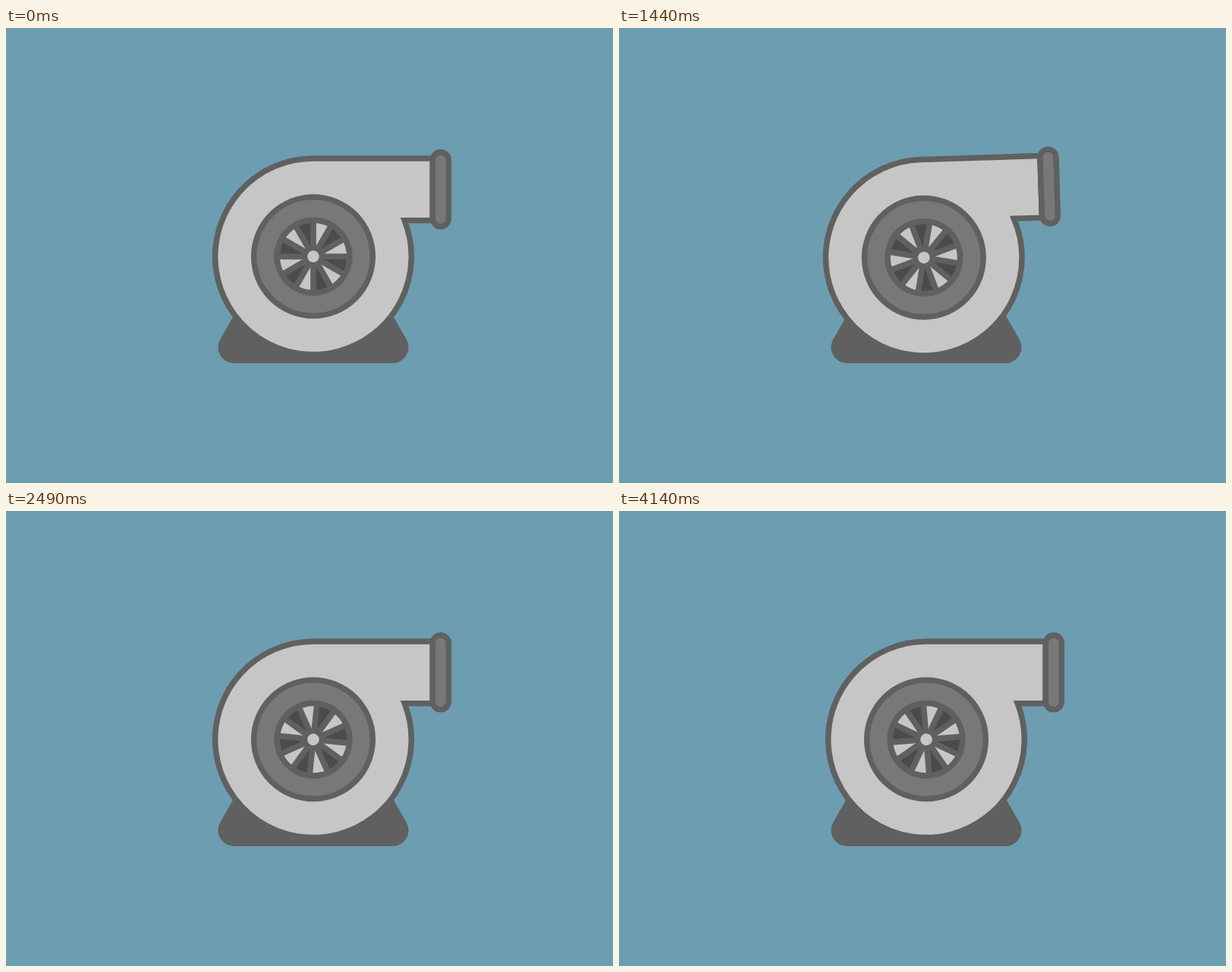
These frames come from a looping animation (800x600 px, 4170 ms). An HTML page:

```html
<!DOCTYPE html>
<html lang="en">
<head>
<meta charset="utf-8">
<title>Turbocharger</title>
<style>
  html, body { margin: 0; width: 100%; height: 100%; overflow: hidden; background: #6d9db1; }
  svg { display: block; width: 100vw; height: 100vh; }
  .shell { stroke: #606060; stroke-width: 7.5; }
</style>
</head>
<body>
<svg viewBox="0 0 800 600">
  <path d="M300.5 421H509.5L475 361H335Z" fill="#606060" stroke="#606060" stroke-width="42" stroke-linejoin="round"/>
  <!-- Everything below is drawn around the wheel centre. -->
  <g id="body">
    <path class="shell" fill="#c6c6c6" d="M157.3 -129.3H0A129.3 129.3 0 1 0 120.2 -47.6H157.3Z"/>
    <rect class="shell" fill="#787878" x="157.3" y="-137.5" width="21" height="98" rx="10.5"/>
    <circle class="shell" fill="#787878" r="78.3"/>
    <circle fill="#606060" r="51.7"/>
  </g>
  <g id="wheel"></g>
</svg>
<script>
const LOOP = 4170, STEP = 30, CX = 405, CY = 301.3;
const body = document.getElementById('body');
const wheel = document.getElementById('wheel');

// Pose keys: [ms, value], eased between neighbours.
const TILT = [[300, 0], [1200, -2], [1380, -2], [1860, 2], [2160, -0.5], [2340, 0.25], [2460, 0]];
const SHIFT_X = [[300, 0], [1200, -3.2], [1560, -3.2], [1830, 0.7], [2180, -0.5], [2400, 0]];
const SHIFT_Y = [[300, 0], [1200, 1.5], [1560, 1.4], [1830, 1], [2300, 0]];

// Spin keys: [step, degrees, degrees per step].
const SPIN = [[0, 15, 4.6], [24, 152, 7.5], [35, 254, 9.8], [60, 512, 11],
  [83, 771, 9.5], [100, 900, 6.3], [139, 1095, 4.6]];

function add(parent, name, attrs) {
  const el = document.createElementNS('http://www.w3.org/2000/svg', name);
  for (const key in attrs) el.setAttribute(key, attrs[key]);
  parent.appendChild(el);
}

function buildWheel() {
  const r = 44, x = r * Math.sin(Math.PI / 12), y = -r * Math.cos(Math.PI / 12);
  for (let i = 0; i < 12; i++) {
    add(wheel, 'path', {
      d: `M0 0L${-x} ${y}A${r} ${r} 0 0 1 ${x} ${y}Z`,
      fill: i % 2 ? '#4b4b4b' : '#c6c6c6',
      transform: `rotate(${i * 30})`
    });
  }
  for (let i = 0; i < 6; i++) {
    add(wheel, 'path', {
      d: 'M0 -45V45', stroke: '#606060', 'stroke-width': 7.7,
      transform: `rotate(${i * 30 + 15})`
    });
  }
  add(wheel, 'circle', { r: 12, fill: '#606060' });
  add(wheel, 'circle', { r: 7.8, fill: '#c6c6c6' });
}

function ease(keys, t) {
  if (t <= keys[0][0]) return keys[0][1];
  for (let i = 1; i < keys.length; i++) {
    const [t0, a] = keys[i - 1], [t1, b] = keys[i];
    if (t <= t1) {
      const p = (t - t0) / (t1 - t0);
      return a + (b - a) * p * p * (3 - 2 * p);
    }
  }
  return keys[keys.length - 1][1];
}

function spinAt(n) {
  let i = 1;
  while (i < SPIN.length - 1 && n > SPIN[i][0]) i++;
  const [n0, a, va] = SPIN[i - 1], [n1, b, vb] = SPIN[i];
  const d = n1 - n0, p = (n - n0) / d, q = 1 - p;
  return a * (1 + 2 * p) * q * q + va * d * p * q * q
    + b * p * p * (3 - 2 * p) - vb * d * p * p * q;
}

function draw(now) {
  const n = Math.floor((now % LOOP) / STEP), t = n * STEP;
  const x = CX + ease(SHIFT_X, t), y = CY + ease(SHIFT_Y, t);
  body.setAttribute('transform', `translate(${x} ${y}) rotate(${ease(TILT, t)})`);
  wheel.setAttribute('transform', `translate(${x} ${y}) rotate(${spinAt(n)})`);
}

buildWheel();
draw(0);
const start = performance.now();
function tick() {
  draw(performance.now() - start);
  requestAnimationFrame(tick);
}
requestAnimationFrame(tick);
</script>
</body>
</html>
```
